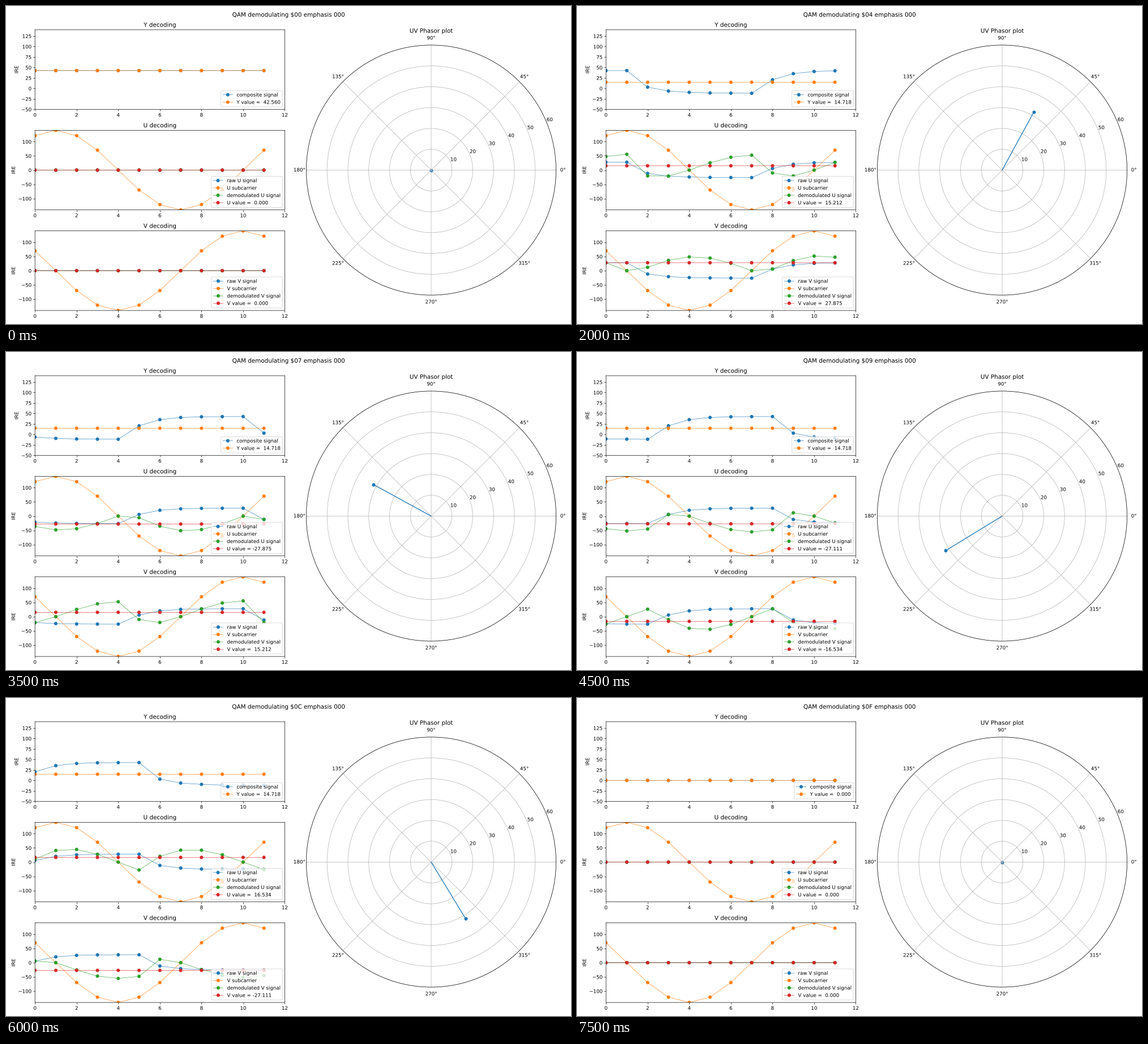
Animation of 998 by 561 pixels, one loop 8 s. Source, as a matplotlib script:

```python
import numpy as np
import matplotlib.pyplot as plt
from matplotlib import patheffects
from matplotlib.animation import FuncAnimation

W, H, DPI = 998, 561, 62.375
# Smooth subpixel rendering: no snapping, text and markers drawn as plain paths
plt.rcParams.update({
    "font.family": "DejaVu Sans",
    "text.hinting": "none",
    "path.snap": False,
    "path.effects": [patheffects.Normal()],
})

N = np.arange(12)
ANGLE = 2 * np.pi * (N - 1) / 12
CARRIER = {"U": np.cos(ANGLE), "V": -np.sin(ANGLE)}

# One filtered square-wave period in IRE: falling half, then rising half
WAVE = np.array([3.0, -6.3, -9.5, -10.9, -11.35, -11.55,
                 20.5, 35.2, 40.4, 42.0, 42.45, 42.55])
WAVE_LUMA = 14.718
WAVE_CHROMA = 31.7462 + 0.7632j      # phasor of hue 2
FLAT = {0: 42.56, 13: -11.76, 14: 0.0, 15: 0.0}

# Layout in pixels from the top left
PANEL_W, PANEL_H, PITCH = 441.2, 140.4, 177.4
LEFT, TOP, POLAR_LEFT = 51.2, 41.9, 530.4
MIDDLE = TOP + PITCH + PANEL_H / 2


def decode(hue):
    """Return composite samples, luma and chroma phasor for a hue."""
    if hue in FLAT:
        return np.full(12, FLAT[hue]), FLAT[hue], 0j
    signal = WAVE[(N + hue - 6) % 12]
    return signal, WAVE_LUMA, WAVE_CHROMA * np.exp(1j * np.pi * (hue - 2) / 6)


fig = plt.figure(figsize=(W / DPI, H / DPI), dpi=DPI, facecolor="white")
title = fig.suptitle("")


def add_axes(left, top, width, height, **kw):
    return fig.add_axes([left / W, 1 - (top + height) / H, width / W, height / H], **kw)


def add_panel(name, row, ylim, ticks, labels):
    ax = add_axes(LEFT, TOP + row * PITCH, PANEL_W, PANEL_H)
    ax.set_title(f"{name} decoding")
    ax.set_ylabel("IRE")
    lines = [ax.plot(N, 0 * N, "o-", linewidth=0.7, label=s)[0] for s in labels]
    ax.set(xlim=(0, 12), ylim=ylim, yticks=ticks)
    return lines, ax.legend(loc="lower right")


def chroma_labels(c):
    return [f"raw {c} signal", f"{c} subcarrier", f"demodulated {c} signal", f"{c} value"]


panels = {"Y": add_panel("Y", 0, (-50, 140), range(-50, 126, 25),
                         ["composite signal", "Y value"])}
for row, name in enumerate("UV", 1):
    panels[name] = add_panel(name, row, (-140, 140), range(-100, 101, 50),
                             chroma_labels(name))

polar = add_axes(POLAR_LEFT, MIDDLE - PANEL_W / 2, PANEL_W, PANEL_W, projection="polar")
polar.set_title("UV Phasor plot")
stem, = polar.plot([0, 0], [0, 0], color="C0", solid_capstyle="butt")
tip = polar.scatter([0], [0], color="C0")
polar.set_ylim(0, 60)
polar.set_yticks(range(10, 61, 10))


def show(name, curves, value):
    lines, legend = panels[name]
    for line, ys in zip(lines, [*curves, np.full(12, value)]):
        line.set_ydata(ys)
    legend.get_texts()[-1].set_text(f"{name} value = {value: .3f}")


def update(hue):
    signal, luma, chroma = decode(hue)
    title.set_text(f"QAM demodulating ${hue:02X} emphasis 000")
    show("Y", [signal], luma)
    raw = signal - luma
    for name, value in (("U", chroma.real), ("V", chroma.imag)):
        carrier = CARRIER[name]
        show(name, [raw, 140 * carrier, 2 * raw * carrier], value)
    theta, r = np.angle(chroma), abs(chroma)
    stem.set_data([theta, theta], [0, r])
    tip.set_offsets([[theta, r]])
    return []


anim = FuncAnimation(fig, update, frames=16, interval=500, repeat=True,
                     repeat_delay=0, blit=False)
plt.show()
```
